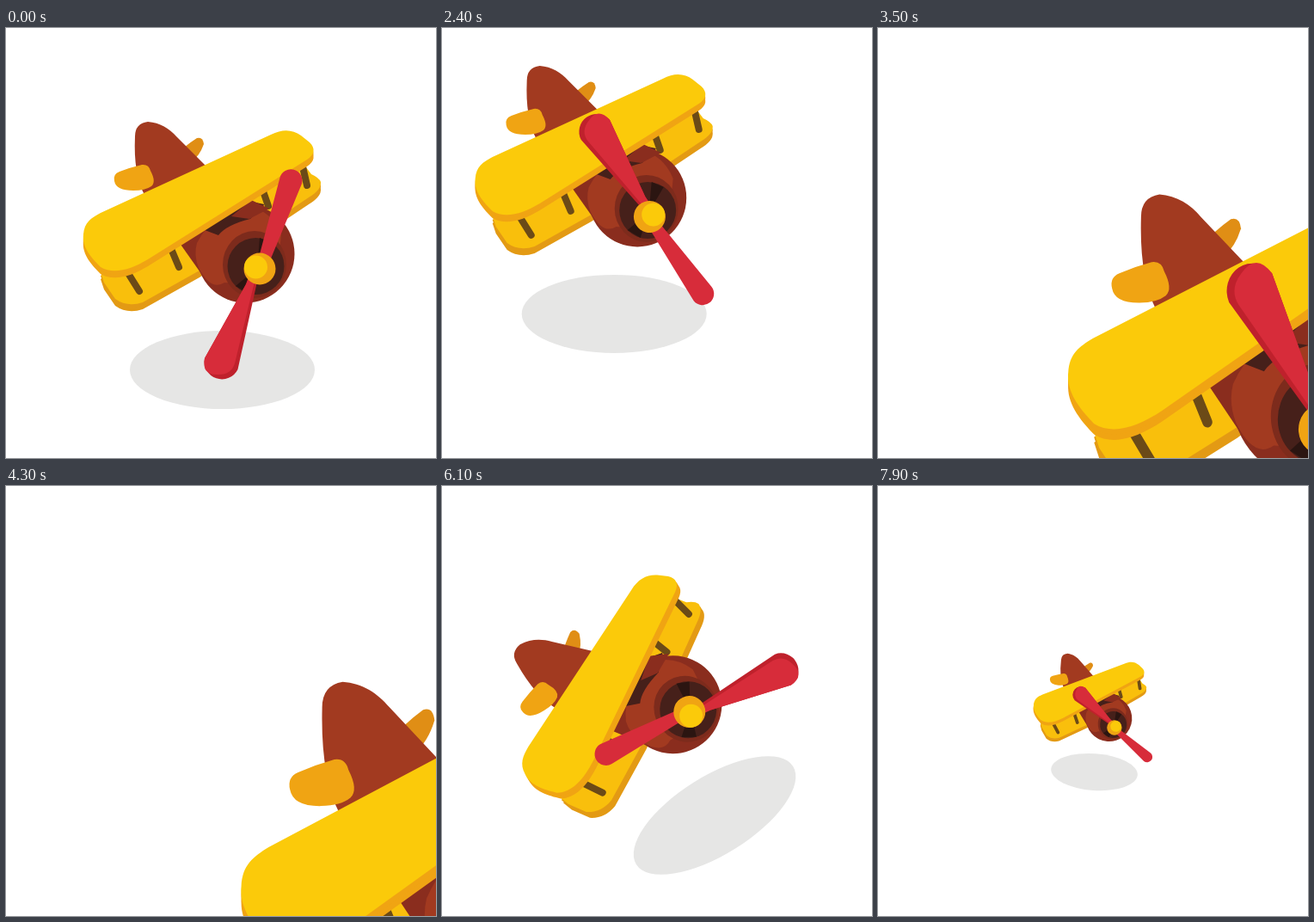
Write an HTML page that moves like this. It is 500 px wide and 500 px high and loops after 8 s.

```html
<!DOCTYPE html>
<html lang="en">
<head>
<meta charset="utf-8">
<title>Biplane</title>
<style>
  html, body { margin: 0; width: 100%; height: 100%; overflow: hidden; background: #fff; }
  svg { display: block; width: 100vw; height: 100vh; }
  .yellow { fill: #fbca0a; }
  .amber { fill: #f9bf0c; }
  .orange { fill: #f0a413; }
  .ochre { fill: #e39a14; }
  .red { fill: #a23a20; }
  .maroon { fill: #8a2d1e; }
  .dark { fill: #46201a; }
  .struts { fill: none; stroke: #6b4a17; stroke-width: 8; stroke-linecap: round; }
</style>
</head>
<body>
<svg viewBox="0 0 500 500">
  <defs>
    <path id="upper" d="M90 240C91 226 99 221 110 215L308 124C322 117 333 118 343 125L353 133C360 140 359 147 350 153L165 269C145 281 125 287 110 278C100 268 88 255 90 240Z"/>
    <path id="lower" d="M110 284L114 296L127 315Q141 325 159 319L225 282L352 197Q367 188 366 179Q364 174 355 170L340 150L200 230Z"/>
  </defs>
  <g id="plane">
    <ellipse cx="251.5" cy="397.5" rx="107.5" ry="45.5" fill="#e6e6e5"/>

    <path d="M200 146Q208 137 222 128Q229 126 230 135Q225 149 216 155Z" fill="#e08e15"/>
    <path class="red" d="M150 126Q150 111 165 109C179 110 190 117 198 126L234 162L300 205L250 305L161 194Q148 170 150 126Z"/>
    <path class="orange" d="M126 178Q124 170 132 167Q145 162 158 159Q166 158 168 166Q175 179 169 184Q162 189 148 189Q128 189 126 178Z"/>

    <use href="#lower" class="ochre" y="8"/>
    <use href="#lower" class="ochre" y="4"/>
    <use href="#lower" class="amber"/>
    <path class="struts" d="M140 282L155 306M190 252L201 278M298 187L305 207M344 157L350 183"/>

    <path class="maroon" d="M199 246L235 297Q248 315 270 318L300 205L250 205Z"/>
    <circle class="maroon" cx="278.500" cy="262.500" r="57"/>
    <path class="red" d="M222 250Q238 218 279 206Q309 212 320 240L314 300L254 296Q238 306 224 279Q218 264 222 250Z"/>
    <path class="dark" d="M231 235L247 241Q256 229 284 222L300 205L268 198Z"/>
    <path class="maroon" d="M262 219L283 222L306 210L285 200Z"/>
    <ellipse cx="289" cy="275" rx="37" ry="39" fill="#7d2b1c"/>
    <circle class="dark" cx="290.500" cy="277" r="33"/>
    <path d="M292 279L295 244L309 250ZM292 279L267 300L282 309Z" fill="#2b1511"/>

    <use href="#upper" class="orange" y="8"/>
    <use href="#upper" class="orange" y="4"/>
    <use href="#upper" class="yellow"/>

    <g id="propeller">
      <path d="M291 278L318.500 174A13 13 0 0 1 344 181L303 280Z" fill="#d72c3a"/>
      <path d="M284 285L279 298L231 384A20.500 20.500 0 0 0 269.500 397L292 295Z" fill="#bf212c"/>
      <path d="M284 285L279 298L231 384Q227 404 247 403Q262 403 266 390L289 295Z" fill="#d72c3a"/>
      <circle class="orange" cx="295" cy="280" r="18.500"/>
      <circle class="yellow" cx="290.500" cy="278" r="13.500"/>
    </g>
  </g>
</svg>
<script>
  const LOOP = 8000, STEP = 100;
  const pivot = { x: 259, y: 276 };
  const axle = { x: 292.7, y: 281.7 };

  const plane = document.getElementById('plane');
  const propeller = document.getElementById('propeller');
  const start = performance.now();

  // Linear rise and fall lasting one second each
  const pulse = (t, peak) => Math.max(0, 1 - Math.abs(t - peak));

  function draw(now) {
    const elapsed = Math.max(0, now - start) % LOOP;
    const t = Math.floor(elapsed / STEP) * STEP / 1000;

    const climb = pulse(t, 2), approach = pulse(t, 4);
    const shrink = 0.59 * Math.max(0, t - 7);
    const x = pivot.x - 85.5 * climb + 416 * approach;
    const y = pivot.y - 108.5 * climb + 356 * approach;
    const scaleX = 1 + 0.9 * approach - shrink;
    const scaleY = 1 + 1.14 * approach - shrink;
    const turn = 40 * (pulse(t, 7) - pulse(t, 6)) - 1.5 * approach;

    // The propeller slows down very slightly as it runs
    const run = Math.max(0, t - 0.95);
    const spin = 337.5 * run - 1.6 * run * run;

    plane.setAttribute('transform',
      `translate(${x} ${y}) rotate(${turn}) scale(${scaleX} ${scaleY}) translate(${-pivot.x} ${-pivot.y})`);
    propeller.setAttribute('transform', `rotate(${spin} ${axle.x} ${axle.y})`);
    requestAnimationFrame(draw);
  }
  draw(start);
</script>
</body>
</html>
```
